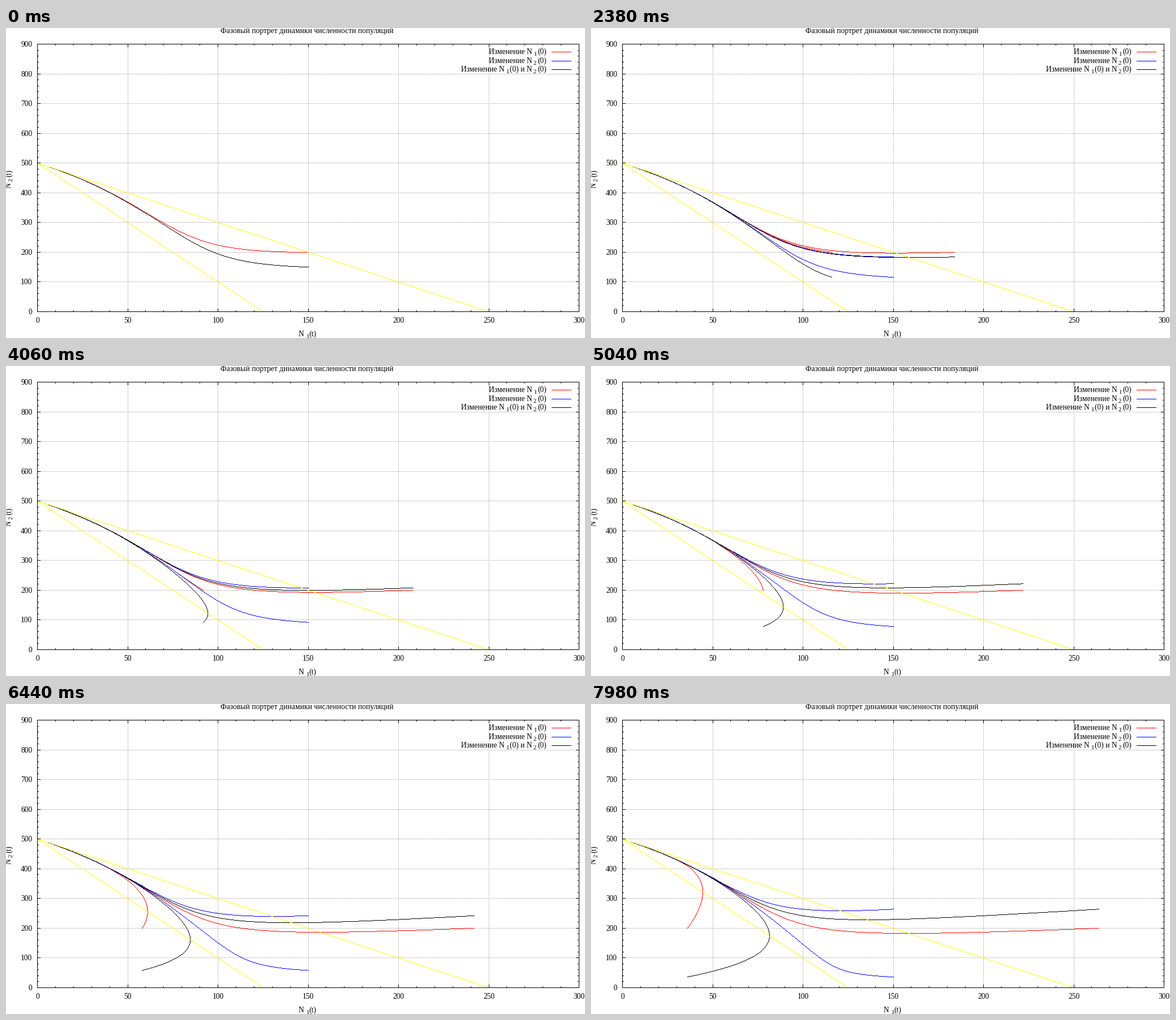
Recreate the animation shown at these times as a matplotlib script. Size 1023 by 548 pixels, loop 8 s.

```python
import numpy as np
import matplotlib.pyplot as plt
from matplotlib.animation import FuncAnimation

W, H, DPI = 1023, 548, 64
LEFT, RIGHT, TOP, BOTTOM = 55, 1012, 28, 501
X_MAX, Y_MAX = 300, 900
LOOP, TICK, HOLD = 8000, 20, 70     # ms
STEPS = (LOOP - 1) // HOLD + 1
FONT = 13.5                         # pixels
SMALL = FONT * 0.8

BLACK, GRAY = (0, 0, 0), (160, 160, 160)
RED, BLUE, YELLOW = (255, 0, 0), (0, 0, 255), (255, 255, 0)

plt.rcParams["font.family"] = "Liberation Serif"
plt.rcParams["toolbar"] = "None"

fig = plt.figure(figsize=(W / DPI, H / DPI), dpi=DPI, facecolor="white")
ax = fig.add_axes([0, 0, 1, 1])
ax.set_xlim(0, W)
ax.set_ylim(H, 0)
ax.axis("off")


def to_x(n1):
    return LEFT + n1 * (RIGHT - LEFT) / X_MAX


def to_y(n2):
    return BOTTOM - n2 * (BOTTOM - TOP) / Y_MAX


def stroke(img, x, y, color, every=1):
    """Hard-edged line, one pixel wide; every=2 makes it dotted."""
    x, y = np.asarray(x, float), np.asarray(y, float)
    steps = np.maximum(abs(np.diff(x)), abs(np.diff(y)))
    dist = np.concatenate([[0], np.cumsum(steps)])
    at = np.arange(0, dist[-1] + 0.5, every)
    cols = np.floor(np.interp(at, dist, x) + 0.5).astype(int)
    rows = np.floor(np.interp(at, dist, y) + 0.5).astype(int)
    img[rows, cols] = color


def text(x, y, s, size=FONT, **kw):
    ax.text(x, y, s, fontsize=size * 72 / DPI, color="black", va="baseline", **kw)


def trajectories():
    """Competing species: every start point integrated at once with RK4."""
    d = np.arange(STEPS, dtype=float)
    same = np.zeros(STEPS)
    n1 = np.array([150 + d, 150 - d, 150 + same, 150 + same, 150 + d, 150 - d])
    n2 = np.array([200 + same, 200 + same, 150 + d, 150 - d, 150 + d, 150 - d])

    def rate(s):
        a, b = s
        return 0.001 * np.array([a * (500 - 4 * a - b), b * (500 - 2 * a - b)])

    state = np.array([n1, n2])
    path = [state]
    times = 100 * np.linspace(0, 1, 321) ** 2
    for h in np.diff(times):
        k1 = rate(state)
        k2 = rate(state + h / 2 * k1)
        k3 = rate(state + h / 2 * k2)
        k4 = rate(state + h * k3)
        state = state + h / 6 * (k1 + 2 * k2 + 2 * k3 + k4)
        path.append(state)
    path = np.array(path)
    return to_x(path[:, 0]), to_y(path[:, 1])


def draw_grid(img):
    for v in range(50, X_MAX, 50):
        stroke(img, [to_x(v)] * 2, [BOTTOM, TOP], GRAY, every=2)
    for v in range(100, Y_MAX, 100):
        stroke(img, [LEFT, RIGHT], [to_y(v)] * 2, GRAY, every=2)


def draw_border(img):
    stroke(img, [LEFT, RIGHT, RIGHT, LEFT, LEFT], [TOP, TOP, BOTTOM, BOTTOM, TOP], BLACK)
    for v in range(10, X_MAX, 10):
        n, x = (2 if v % 50 else 5), [to_x(v)] * 2
        stroke(img, x, [BOTTOM, BOTTOM - n], BLACK)
        stroke(img, x, [TOP, TOP + n], BLACK)
    for v in range(20, Y_MAX, 20):
        n, y = (2 if v % 100 else 5), [to_y(v)] * 2
        stroke(img, [LEFT, LEFT + n], y, BLACK)
        stroke(img, [RIGHT, RIGHT - n], y, BLACK)


def draw_labels():
    text(532, 9, "Фазовый портрет динамики численности популяций", ha="center")
    for v in range(0, X_MAX + 1, 50):
        text(to_x(v) + 0.5, 521, str(v), ha="center")
    for v in range(0, Y_MAX + 1, 100):
        text(46.5, to_y(v) + 5, str(v), ha="right")

    text(517, 545, "N")
    text(530, 548, "1", SMALL)
    text(535, 545, "(t)")
    up = dict(rotation=90, rotation_mode="anchor")
    text(9, 283, "N", **up)
    text(12, 271, "2", SMALL, **up)
    text(9, 263, "(t)", **up)


def draw_legend(img):
    for y, sub, color in ((42, "1", RED), (58, "2", BLUE), (73, "2", BLACK)):
        base = y + 4
        if color == BLACK:
            text(881, base, "Изменение N", ha="right")
            text(883, base + 3, "1", SMALL)
            text(930, base, "(0) и N", ha="right")
        else:
            text(930, base, "Изменение N", ha="right")
        text(932, base + 3, sub, SMALL)
        text(955.5, base, "(0)", ha="right")
        stroke(img, [964, 998], [y, y], color)


paths_x, paths_y = trajectories()
backdrop = np.full((H, W, 3), 255, np.uint8)
draw_grid(backdrop)
draw_legend(backdrop)
draw_labels()
picture = fig.figimage(backdrop, origin="upper", zorder=-1)


def update(i):
    step = min((i * TICK + TICK // 2) // HOLD, STEPS - 1)
    img = backdrop.copy()
    for k, color in enumerate((RED, RED, BLUE, BLUE, BLACK, BLACK)):
        stroke(img, paths_x[:, k, step], paths_y[:, k, step], color)
    for foot in (125, 250):
        stroke(img, [to_x(0), to_x(foot)], [to_y(500), to_y(0)], YELLOW)
    draw_border(img)
    picture.set_data(img)
    return [picture]


anim = FuncAnimation(fig, update, frames=LOOP // TICK, interval=TICK,
                     repeat=True, repeat_delay=0, blit=False)
plt.show()
```
